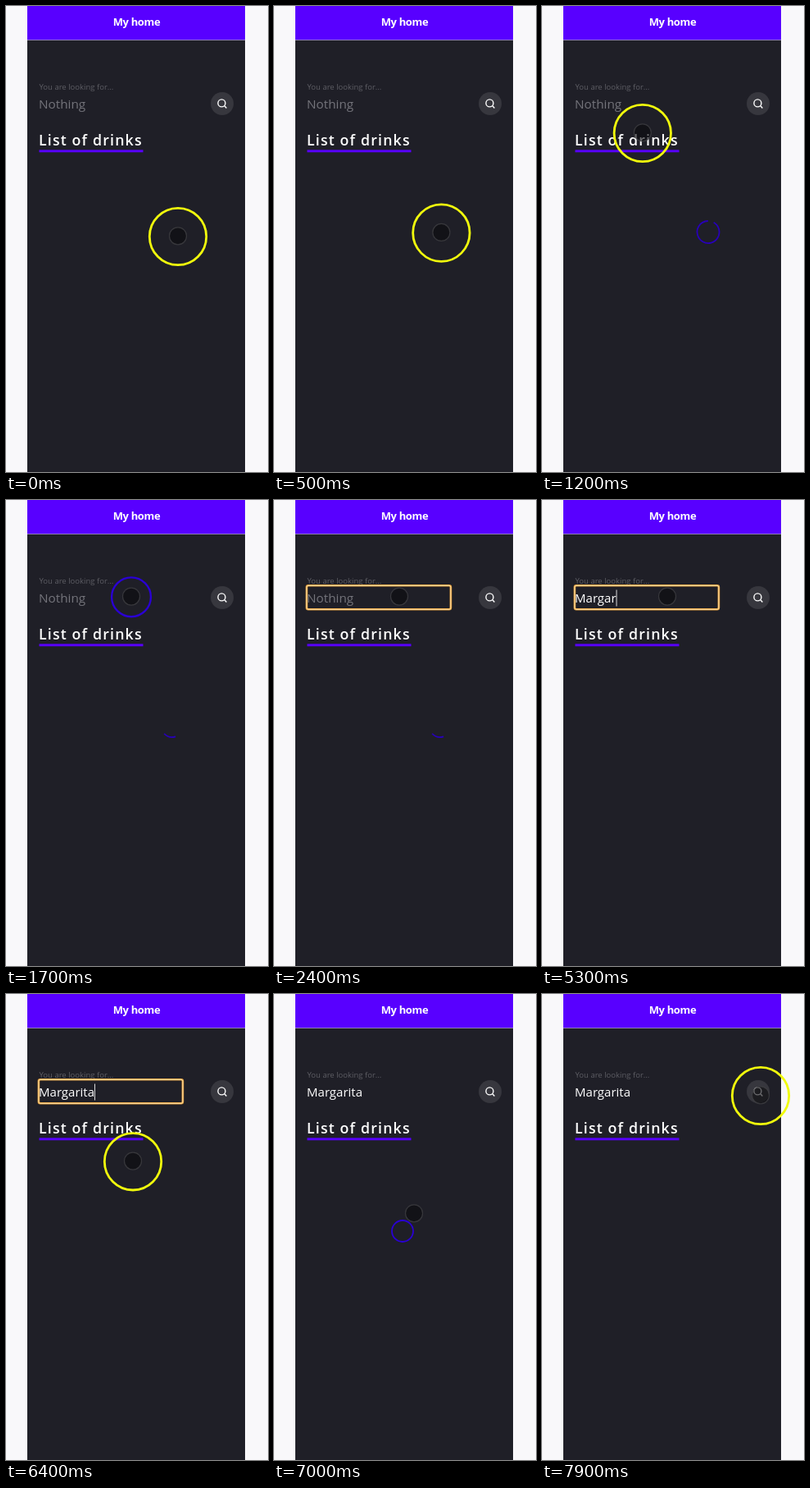
Animation, 320 px wide and 568 px high, one loop 8 s. Source, as an HTML page with a canvas:

```html
<!DOCTYPE html>
<html lang="en">
<head>
<meta charset="utf-8">
<title>My home</title>
<style>
  html, body { margin: 0; width: 100%; height: 100%; overflow: hidden; background: #f9f8fa; }
  canvas { display: block; width: 320px; height: 568px; }
</style>
</head>
<body>
<canvas id="stage"></canvas>
<script>
const W = 320, H = 568, LOOP = 8000, TAU = Math.PI * 2;
const canvas = document.getElementById('stage');
const ctx = canvas.getContext('2d');
const dpr = window.devicePixelRatio || 1;
canvas.width = W * dpr;
canvas.height = H * dpr;

const PURPLE = '#5800ff', DARK = '#1f1f27', YELLOW = '#f1fb0c', BLUE = '#2a00d4';
const FONT = '"Open Sans", "Noto Sans", sans-serif';
const WORD = 'Margarita', TYPE_START = 3700, TYPE_STEP = 290;
const CLICK_DELAY = 50, CLICK_TIME = 400;

// Places where the pointer rests between moves
const STOPS = [
  { arrive: 0, leave: 0, x: 210, y: 281 },
  { arrive: 700, leave: 950, x: 203, y: 275.5, click: true },
  { arrive: 1200, leave: 1200, x: 122.8, y: 155 },
  { arrive: 1500, leave: 6200, x: 153, y: 118.3, click: true },
  { arrive: 6600, leave: 6800, x: 157, y: 289, click: true },
  { arrive: 7700, leave: LOOP, x: 267, y: 124 }
];
const [, firstClick, , fieldClick, blurClick] = STOPS;

const clamp = u => Math.max(0, Math.min(1, u));
const ease = u => u * u * (3 - 2 * u);
const mix = (a, b, u) => a + (b - a) * u;
const clickAt = stop => stop.arrive + CLICK_DELAY;

function pointerAt(t) {
  const i = Math.max(1, STOPS.findIndex(s => t < s.arrive));
  const next = t >= STOPS.at(-1).arrive ? STOPS.length - 1 : i;
  const a = STOPS[next - 1], b = STOPS[next];
  const u = ease(clamp((t - a.leave) / (b.arrive - a.leave)));
  return { x: mix(a.x, b.x, u), y: mix(a.y, b.y, u) };
}

function text(str, x, y, size, color, weight = 400, spacing = 0, align = 'left') {
  ctx.font = `${weight} ${size}px ${FONT}`;
  ctx.letterSpacing = spacing + 'px';
  ctx.textAlign = align;
  ctx.fillStyle = color;
  ctx.fillText(str, x, y);
  return ctx.measureText(str).width;
}

function rect(x, y, w, h, color) {
  ctx.fillStyle = color;
  ctx.fillRect(x, y, w, h);
}

function disc(x, y, r, color) {
  ctx.beginPath();
  ctx.arc(x, y, r, 0, TAU);
  ctx.fillStyle = color;
  ctx.fill();
}

function stroke(width, color) {
  ctx.lineWidth = width;
  ctx.strokeStyle = color;
  ctx.stroke();
}

function ring(x, y, r, width, color, from = 0, to = TAU) {
  ctx.beginPath();
  ctx.arc(x, y, r, from, to);
  stroke(width, color);
}

function page() {
  rect(0, 0, W, H, '#f9f8fa');
  rect(26, 0, 266, H, DARK);
  rect(26, 0, 266, 41, PURPLE);
  rect(26, 41, 266, 1, '#8f79b8');
  text('My home', 159.5, 24, 13, '#fff', 700, -0.35, 'center');
  text('You are looking for...', 40.5, 102, 9.5, '#5d5d64');
  text('List of drinks', 40, 170, 17.8, '#fff', 600, 1.15);
  rect(40.5, 175.4, 127, 2.9, PURPLE);
}

function searchButton() {
  disc(264, 119, 14, '#37373e');
  ring(263.4, 118.4, 4.5, 1.4, '#fff');
  ctx.beginPath();
  ctx.moveTo(266.8, 121.8);
  ctx.lineTo(269.4, 124.4);
  stroke(1.4, '#fff');
}

function field(t) {
  const focused = t >= clickAt(fieldClick) + CLICK_TIME && t < clickAt(blurClick);
  if (focused) {
    rect(40, 103, 176, 30, DARK);
    ctx.beginPath();
    ctx.roundRect(39.9, 104.3, 176, 29, 2);
    stroke(2.6, '#e9a23b');
    stroke(1, '#fbe0ae');
  }
  const count = Math.floor((t - TYPE_START) / TYPE_STEP) + 1;
  if (count < 1) {
    text('Nothing', 40, 125, 15.3, '#74747b');
    return;
  }
  const w = text(WORD.slice(0, count), 40, 125, 15, '#fff');
  const lastKey = TYPE_START + (Math.min(count, WORD.length) - 1) * TYPE_STEP;
  if (focused && (t - lastKey) % 1000 < 500) rect(40 + w, 109.5, 1, 20, '#ddd');
}

// The first click's ring fades down to a short arc at its bottom
function leftover(t) {
  const begin = clickAt(firstClick) + CLICK_TIME;
  if (t < begin || t >= 4600) return;
  const half = mix(0.92, 0.18, clamp((t - begin - 50) / 150)) * Math.PI;
  const mid = 0.58 * Math.PI;
  ring(firstClick.x, firstClick.y, 13.5, 1.8, '#2800b8', mid - half, mid + half);
}

function pointer(t) {
  const { x, y } = pointerAt(t);
  disc(x, y - 0.7, 10.5, 'rgba(10,10,13,0.6)');
  ring(x, y - 0.7, 10.5, 1.2, 'rgba(64,64,68,0.8)');

  const clicked = STOPS.find(s => s.click && t >= clickAt(s) &&
    t < Math.max(s.leave, clickAt(s) + CLICK_TIME));
  if (!clicked) {
    ring(x, y, 34.7, 2.8, YELLOW);
    return;
  }
  const age = t - clickAt(clicked);
  if (age < CLICK_TIME) {
    const u = clamp(age / 300);
    ring(clicked.x, clicked.y, mix(35, 13, u), mix(3, 1.8, u), BLUE);
  }
}

function draw(t) {
  ctx.setTransform(dpr, 0, 0, dpr, 0, 0);
  page();
  searchButton();
  field(t);
  leftover(t);
  pointer(t);
}

const start = performance.now();
function frame() {
  draw((performance.now() - start) % LOOP);
  requestAnimationFrame(frame);
}
frame();
</script>
</body>
</html>
```
